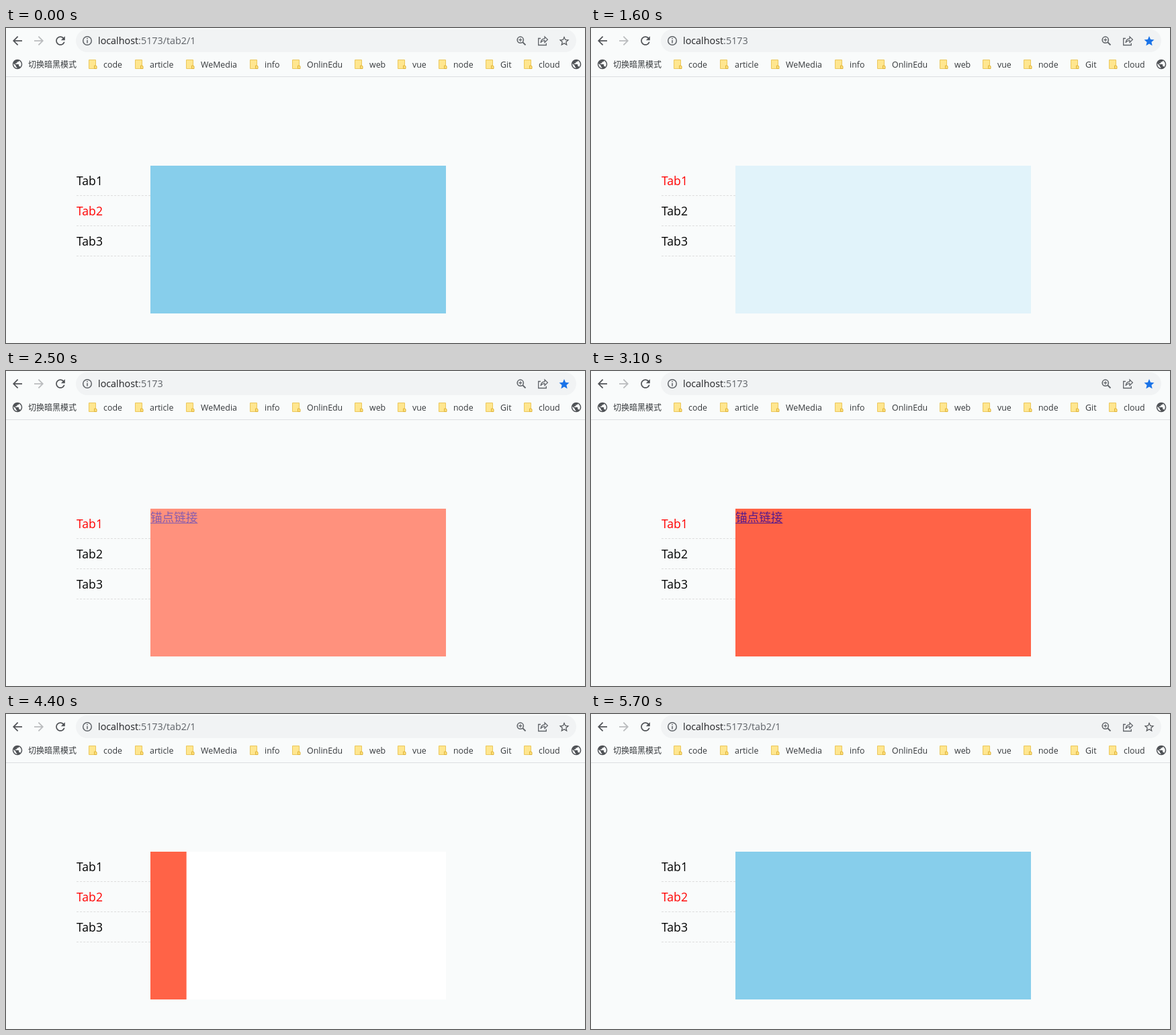
An HTML page for the animation above (6.5 s loop, 862 px wide and 469 px high).

```html
<!DOCTYPE html>
<html lang="zh">
<head>
<meta charset="utf-8">
<title>Tabs</title>
<style>
  html, body { margin: 0; width: 100%; height: 100%; overflow: hidden; background: #f9fbfb; }
  body { position: relative; font-family: "Open Sans", "Noto Sans CJK SC", "Noto Sans CJK", sans-serif; }
  #bar { position: absolute; left: 0; top: 0; }
  #tabs { position: absolute; left: 105px; top: 205px; width: 110px; }
  .tab {
    box-sizing: border-box; height: 45px; border-bottom: 1px dashed #ddd;
    font-size: 17.6px; line-height: 44px; color: #000;
  }
  .tab.on { color: #f00; }
  #view {
    position: absolute; left: 215px; top: 205px; width: 440px; height: 220px;
    overflow: hidden; background: #fff;
  }
  .page { position: absolute; inset: 0; }
  #red { background: tomato; }
  #blue { background: skyblue; }
  #link {
    position: absolute; left: 0; top: 0; font: 17.6px/23px "Noto Sans CJK SC", "Noto Sans CJK", sans-serif;
    color: #551a8b; white-space: nowrap;
    text-decoration: underline 1px; text-underline-offset: 2px;
  }
</style>
</head>
<body>
<svg id="bar" width="862" height="73" viewBox="0 0 862 73">
  <defs>
    <path id="arrow" d="M20 11H7.83l5.59-5.59L12 4l-8 8 8 8 1.41-1.41L7.83 13H20v-2z"/>
    <path id="globe" d="M12 2C6.48 2 2 6.48 2 12s4.48 10 10 10 10-4.48 10-10S17.52 2 12 2zm-1 17.93c-3.95-.49-7-3.85-7-7.93 0-.62.08-1.21.21-1.79L9 15v1c0 1.1.9 2 2 2v1.93zm6.9-2.54c-.26-.81-1-1.39-1.9-1.39h-1v-3c0-.55-.45-1-1-1H8v-2h2c.55 0 1-.45 1-1V7h2c1.1 0 2-.9 2-2v-.41c2.93 1.19 5 4.06 5 7.41 0 2.08-.8 3.97-2.1 5.39z"/>
    <g id="folder">
      <path d="M.5 .5h10v13h-10z" fill="#ffe68f" stroke="#ebc75c"/>
      <path d="M8.5 13.5v-4.5h2.5l1 1v3.5z" fill="#ffe07a" stroke="#dfb43c"/>
    </g>
  </defs>
  <rect x="104" y="2" width="745" height="34" rx="17" fill="#f1f3f4"/>
  <path d="M0 72.5H862" stroke="#dcdfe1"/>
  <g fill="#505357">
    <use href="#arrow" transform="translate(6.5 8.5) scale(.875)"/>
    <use href="#arrow" transform="translate(59.5 8.5) scale(-.875 .875)" fill="#babcbe"/>
    <path transform="translate(70.8 8.8) scale(.85)" d="M17.65 6.35C16.2 4.9 14.21 4 12 4c-4.42 0-7.99 3.58-7.99 8s3.57 8 7.99 8c3.73 0 6.84-2.55 7.73-6h-2.08c-.82 2.33-3.04 4-5.65 4-3.31 0-6-2.69-6-6s2.69-6 6-6c1.66 0 3.14.69 4.22 1.78L13 11h7V4l-2.35 2.35z"/>
    <use href="#globe" transform="translate(8.4 45.4) scale(.72)"/>
    <use href="#globe" transform="translate(840.4 45.4) scale(.72)"/>
  </g>
  <g fill="none" stroke="#5f6368" stroke-width="1.5">
    <circle cx="121" cy="19" r="6.3"/>
    <path d="M121 18v4.5M121 15v1.6"/>
    <circle cx="765.8" cy="17.7" r="4.6"/>
    <path d="M769.2 21.1l4.3 4.3" stroke-width="2"/>
    <path d="M763.3 17.7h5M765.8 15.2v5" stroke-width="1.2"/>
    <path d="M796 15.5h-3.3v10h11.6v-3" stroke-width="1.3"/>
    <path d="M796 22c.4-4 2.6-6 6-6.2v-2.9l4.4 4.3-4.4 4.3v-2.8c-2.6 0-4.4.9-6 3.3z" stroke-width="1.2"/>
  </g>
  <g transform="translate(822 10.5) scale(.75)">
    <path id="starOff" fill="#505357" d="M22 9.24l-7.19-.62L12 2 9.19 8.63 2 9.24l5.46 4.73L5.82 21 12 17.27 18.18 21l-1.63-7.03L22 9.24zM12 15.4l-3.76 2.27 1-4.28-3.32-2.88 4.38-.38L12 6.1l1.71 4.04 4.38.38-3.32 2.88 1 4.28L12 15.4z"/>
    <path id="starOn" fill="#1a73e8" d="M12 17.27L18.18 21l-1.64-7.03L22 9.24l-7.19-.61L12 2 9.19 8.63 2 9.24l5.46 4.73L5.82 21z"/>
  </g>
  <text x="137" y="24" font-size="14.35" fill="#202124">localhost<tspan fill="#5f6368">:5173<tspan id="path">/tab2/1</tspan></tspan></text>
  <g id="marks" font-size="12.4" fill="#35383b">
    <text x="33" y="59" font-size="12">切换暗黑模式</text>
  </g>
</svg>
<div id="tabs">
  <div class="tab">Tab1</div>
  <div class="tab">Tab2</div>
  <div class="tab">Tab3</div>
</div>
<div id="view">
  <div class="page" id="blue"></div>
  <div class="page" id="red"><span id="link">锚点链接</span></div>
</div>
<script>
const $ = id => document.getElementById(id);
const LOOP = 6500, STEP = 100, SPAN = 870, WIDTH = 440;

const marks = [
  [145, 'code'], [214, 'article'], [290, 'WeMedia'], [385, 'info'], [448, 'OnlinEdu'],
  [541, 'web'], [605, 'vue'], [666, 'node'], [736, 'Git'], [793, 'cloud']
];
$('marks').innerHTML += marks.map(([x, name]) =>
  `<use href="#folder" x="${x - 22}" y="47"/><text x="${x}" y="59">${name}</text>`).join('');

// CSS "ease": cubic-bezier(.25, .1, .25, 1), whose x control points are equal
function ease(x) {
  if (x <= 0) return 0;
  if (x >= 1) return 1;
  let lo = 0, hi = 1, s;
  for (let i = 0; i < 24; i++) {
    s = (lo + hi) / 2;
    const bx = .75 * s * (1 - s) + s * s * s;
    if (bx < x) lo = s; else hi = s;
  }
  return .3 * s * (1 - s) ** 2 + 3 * s * s * (1 - s) + s ** 3;
}
const progress = (t, start) => ease((t - start) / SPAN);

// Stretches during which the picture rests: [from, to, time shown]
const rests = [[1600, 1800, 1600], [1800, 2300, 2100], [2700, 2900, 2700], [2900, 3100, 2900]];

const tabs = [...document.querySelectorAll('.tab')];

function place(el, opacity, x) {
  el.style.opacity = opacity;
  el.style.transform = `translateX(${x}px)`;
  el.style.visibility = opacity > 0 && Math.abs(x) < WIDTH ? 'visible' : 'hidden';
}

function draw(now) {
  const t = Math.floor(now % LOOP / STEP) * STEP;
  const rest = rests.find(([a, b]) => t >= a && t < b);
  const p = rest ? rest[2] : t;

  const active = t >= 1200 && t < 3900 ? 0 : 1;
  tabs.forEach((tab, i) => tab.classList.toggle('on', i === active));

  const home = t >= 1300 && t < 4000;
  $('path').textContent = home ? '' : '/tab2/1';
  $('starOn').style.display = home ? '' : 'none';
  $('starOff').style.display = home ? 'none' : '';

  if (t < 3000) place($('blue'), 1 - progress(p, 1208), 0);
  else place($('blue'), 1, WIDTH * (1 - progress(t, 4804)));

  const fade = p < 2300 ? 0 : progress(p, 2139);
  place($('red'), fade, -WIDTH * progress(t, 3887));
}

function tick() {
  draw(performance.now());
  requestAnimationFrame(tick);
}
tick();
</script>
</body>
</html>
```
